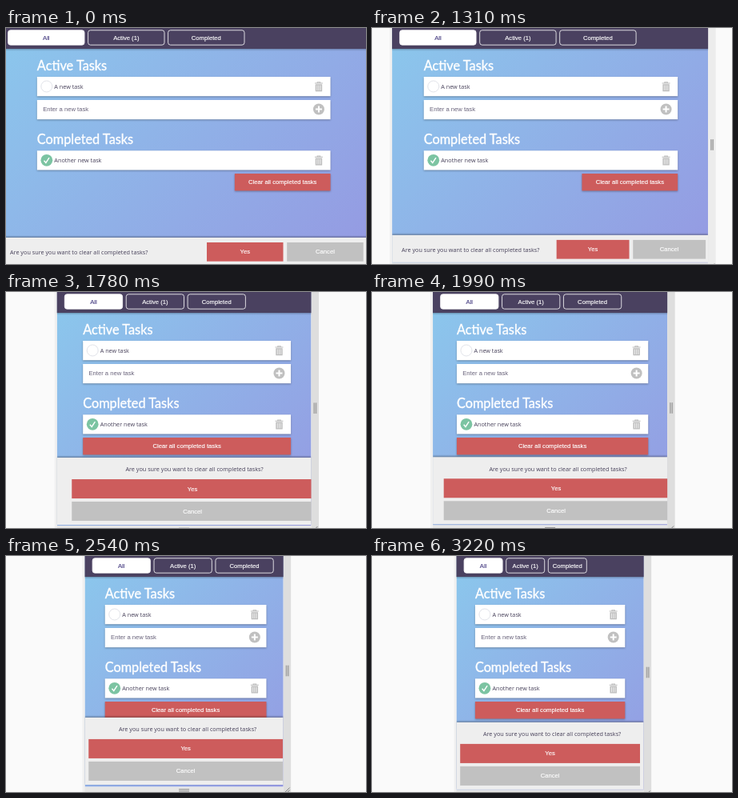
An HTML page that plays this animation: 450x295 px, repeating every 4190 ms.

```html
<!DOCTYPE html>
<html lang="en">
<head>
<meta charset="utf-8">
<title>Responsive task list</title>
<style>
  html, body { margin: 0; width: 100%; height: 100%; overflow: hidden; background: #fafafa; }
  svg { display: block; width: 450px; height: 295px; }
  text { font: 7.65px "Liberation Sans", Arial, sans-serif; fill: #fff; }
  .mid { text-anchor: middle; stroke: #fff; stroke-width: .15px; }
  .body { font: 7.25px "Open Sans", "Noto Sans", sans-serif; fill: #453f58; }
  .hint { fill: #68627a; }
  .head { font: 16.3px Lato, sans-serif; stroke: #fff; stroke-width: .35px; }
  .lift { filter: drop-shadow(0 1px 1px rgba(0, 0, 0, .3)); }
</style>
</head>
<body>
<svg id="stage" viewBox="0 0 450 295"></svg>
<script>
const LOOP = 4190, CENTER_SUM = 445.2;
const STACK_WIDTH = 344, SMALL_WIDTH = 244;
const RED = '#cd5c5c', GREY = '#c1c1c1', PURPLE = '#4a4160';

// [ms, value] pairs: viewport left edge, layout lag, frame lag, viewport bottom, gap under the dialog
const leftKeys = [[1110, -6.6], [1310, 25], [1600, 50], [1650, 56], [1990, 76],
                  [2220, 86], [2540, 98.5], [2740, 103], [3220, 105.5]];
const lagKeys = [[1110, 0], [1310, 1.7], [1600, 8], [1990, 6], [2540, 4], [3220, 0]];
const frameLagKeys = [[1310, 0], [1600, 3], [1650, 0]];
const bottomKeys = [[1110, 296], [1310, 293.5], [1600, 292.5], [1990, 291.5], [2540, 288.5], [3220, 292.5]];
const gapKeys = [[1110, 0], [1310, .6], [1600, .8], [1990, 1.2], [2540, 2.6], [3220, .6]];

function track(keys, t) {
  if (t <= keys[0][0]) return keys[0][1];
  for (let i = 1; i < keys.length; i++) {
    const [t0, a] = keys[i - 1], [t1, b] = keys[i];
    if (t < t1) return a + (b - a) * (t - t0) / (t1 - t0);
  }
  return keys[keys.length - 1][1];
}

const stage = document.getElementById('stage');

function set(node, attrs) {
  for (const name in attrs) node.setAttribute(name, attrs[name]);
  return node;
}
function add(parent, tag, attrs = {}) {
  return parent.appendChild(set(document.createElementNS('http://www.w3.org/2000/svg', tag), attrs));
}
function label(parent, str, cls, attrs = {}) {
  const node = add(parent, 'text', { class: cls, ...attrs });
  node.textContent = str;
  return node;
}
function box(node, x, y, width, height) {
  set(node, { x, y, width, height });
}
function move(node, x, y = 0) {
  set(node, { transform: `translate(${x} ${y})` });
}
function button(parent, str, fill, attrs) {
  return { rect: add(parent, 'rect', { fill, ...attrs }), text: label(parent, str, 'mid') };
}
function placeButton({ rect, text }, x, y, w, h) {
  box(rect, x, y, w, h);
  set(text, { x: x + w / 2, y: y + h / 2 + 2.5 });
}

const defs = add(stage, 'defs');
const sky = add(defs, 'linearGradient', { id: 'sky', gradientUnits: 'userSpaceOnUse' });
add(sky, 'stop', { offset: 0, 'stop-color': '#8bc6ec' });
add(sky, 'stop', { offset: 1, 'stop-color': '#9599e2' });
const clip = add(add(defs, 'clipPath', { id: 'view' }), 'rect');

// Resizable device frame
add(stage, 'rect', { width: 450, height: 295, fill: '#fafafa' });
const edges = add(stage, 'rect', { fill: '#f0f0f0' });
const sideBar = add(stage, 'rect');
const bottomBar = add(stage, 'rect', { fill: '#e6e6e6' });
const sideGrip = add(stage, 'g');
add(sideGrip, 'rect', { x: 3, y: -7, width: 4, height: 13.5, fill: '#c4c4c4' });
add(sideGrip, 'path', { d: 'M3.6-7v13.5M6.2-7v13.5', stroke: '#999', 'stroke-width': .9 });
const bottomGrip = add(stage, 'path', { d: 'M-6.5 3.2h13M-6.5 5.4h13', stroke: '#888', 'stroke-width': 1 });
const corner = add(stage, 'path', { d: 'M2 7l6-6M5 7l3-3', stroke: '#777', 'stroke-width': .9 });

// Page
const page = add(stage, 'g', { 'clip-path': 'url(#view)' });
const backdrop = add(page, 'rect', { fill: 'url(#sky)' });
const header = add(page, 'rect', { y: -5, height: 31, fill: PURPLE, class: 'lift' });
const tabs = ['All', 'Active (1)', 'Completed'].map((name, i) => {
  const tab = button(page, name, i ? 'none' : '#fff', { rx: 3, stroke: '#fff', 'stroke-width': .8 });
  if (!i) tab.text.style.fill = tab.text.style.stroke = '#4b4285';
  return tab;
});

const cards = [61, 90, 153.3].map(y => add(page, 'rect', { y, height: 24.2, fill: '#fff', class: 'lift' }));
const content = add(page, 'g');
label(content, 'Active Tasks', 'head', { y: 53 });
label(content, 'Completed Tasks', 'head', { y: 145.4 });
add(content, 'circle', { cx: 12, cy: 73, r: 7, fill: '#fff', stroke: '#d4d7e0', 'stroke-width': .7 });
label(content, 'A new task', 'body', { x: 21.5, y: 75.7 });
label(content, 'Enter a new task', 'hint', { x: 7.3, y: 104 });
add(content, 'circle', { cx: 12, cy: 165.3, r: 7.4, fill: '#7cc4a2' });
add(content, 'path', { d: 'M8.7 165.8l2.3 2.7 4.2-6.3', fill: 'none', stroke: '#fff', 'stroke-width': 1.4 });
label(content, 'Another new task', 'body', { x: 21.5, y: 168 });

const icons = add(page, 'g');
for (const y of [67, 159.3]) {
  const bin = add(icons, 'g', { fill: 'none', stroke: '#bdbdbd' });
  move(bin, -14.6, y);
  add(bin, 'path', { d: 'M-5 2h10M-1.8 1.8V.7h3.6v1.1', 'stroke-width': 1.1 });
  add(bin, 'path', { d: 'M-4.2 3.3h8.4v9h-8.4z', fill: '#bdbdbd', stroke: 'none' });
  add(bin, 'path', { d: 'M-2.2 4.5v6.5M0 4.5v6.5M2.2 4.5v6.5', stroke: '#fff', 'stroke-width': .8 });
}
add(icons, 'circle', { cx: -14.6, cy: 101.5, r: 7, fill: '#c0c0c0' });
add(icons, 'path', { d: 'M-18.6 101.5h8M-14.6 97.5v8', stroke: '#fff', 'stroke-width': 2 });
const clear = button(page, 'Clear all completed tasks', RED, { class: 'lift' });

// Dialog
const dialog = add(page, 'rect', { fill: '#eee' });
dialog.style.filter = 'drop-shadow(0 -1px 1px rgba(0, 0, 0, .4))';
const question = label(page, 'Are you sure you want to clear all completed tasks?', 'body');
const yes = button(page, 'Yes', RED);
const cancel = button(page, 'Cancel', GREY);

function drawFrame(t, left, right, bottom) {
  const barX = right + track(frameLagKeys, t);
  box(edges, left - 3, 0, barX - left + 3, 295);
  box(sideBar, barX, 0, 9.5, 295);
  set(sideBar, { fill: t < 1450 ? '#ececec' : '#dedede' });
  box(bottomBar, left, bottom, right - left, Math.max(0, 295 - bottom));
  move(sideGrip, barX, bottom / 2 - .5);
  move(bottomGrip, CENTER_SUM / 2, bottom);
  move(corner, barX, bottom);
  box(clip, left, 0, right - left, bottom);
}

function drawDialog(left, right, width, bottom, stacked) {
  const end = left + width - 4.7;
  const height = stacked ? 84 : 34;
  box(dialog, left, bottom - height, right - left, height);
  if (stacked) {
    const start = left + 4.7 + Math.max(0, (width - 252) * .19);
    set(question, { x: (start + end) / 2 + 2.5, y: bottom - 66.7, 'text-anchor': 'middle' });
    placeButton(yes, start, bottom - 57, end - start, 24);
    placeButton(cancel, start, bottom - 29, end - start, 24);
  } else {
    const w = Math.min(95.5, 91 - (397 - width) * .43);
    set(question, { x: left + 12, y: bottom - 12.8, 'text-anchor': 'start' });
    placeButton(yes, end - 2 * w - 4.7, bottom - 28, w, 23.7);
    placeButton(cancel, end - w, bottom - 28, w, 23.7);
  }
}

function draw(t) {
  const left = track(leftKeys, t) - (t < 850 ? .4 : 0);
  const right = CENTER_SUM - left + (t < 850 ? -.8 : 0);
  const bottom = track(bottomKeys, t);
  const width = right - left + track(lagKeys, t);
  const stacked = width < STACK_WIDTH;

  drawFrame(t, left, right, bottom);

  const w = right - left, h = bottom - 26;
  const cx = left + w / 2, cy = 26 + h / 2, reach = (w + h) / 4;
  set(sky, { x1: cx - reach, y1: cy - reach, x2: cx + reach, y2: cy + reach });
  box(backdrop, left, 0, w, bottom);
  set(header, { x: left - 5, width: w + 10 });

  const tabWidth = width < SMALL_WIDTH ? 48 : stacked ? 72.3 : 95.4;
  tabs.forEach((tab, i) => placeButton(tab, left + 9.6 + i * (tabWidth + 4.6), 2.8, tabWidth, 18.4));

  const start = left + width * .1, end = left + width * .9;
  for (const card of cards) set(card, { x: start, width: end - start });
  move(content, start);
  move(icons, end);
  const clearWidth = stacked ? end - start : 119.7;
  placeButton(clear, end - clearWidth, 182, clearWidth, 21.4);

  drawDialog(left, right, width, bottom - track(gapKeys, t), stacked);
}

const begin = performance.now();
function tick() {
  draw((performance.now() - begin) % LOOP);
  requestAnimationFrame(tick);
}
tick();
</script>
</body>
</html>
```
